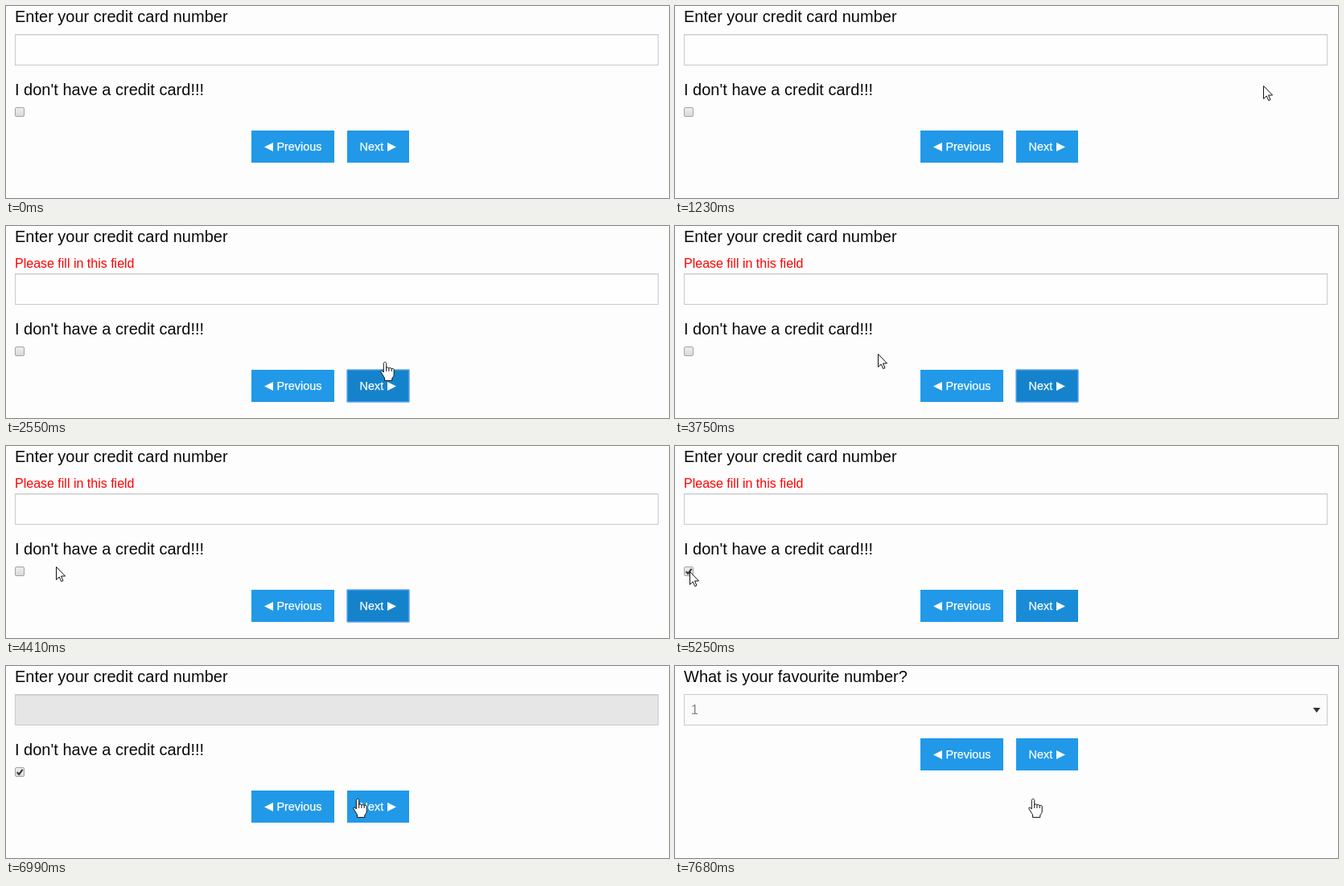
Animation of 824 by 239 pixels, one loop 8 s. Source, as an HTML page:

```html
<!DOCTYPE html>
<html lang="en">
<head>
<meta charset="utf-8">
<title>Credit card form</title>
<style>
  html, body { margin: 0; width: 100%; height: 100%; overflow: hidden; background: #fdfdfd; }
  svg { display: block; }
  text { font-family: "Liberation Sans", Arial, sans-serif; font-size: 20px; fill: #0a0a0a; }
  .button text { font-size: 14.4px; fill: #fefefe; stroke: #fefefe; stroke-width: .25; }
  .button path { fill: #fefefe; }
  #error { font-size: 16px; fill: #f00; }
  .field { stroke: #cacaca; }
</style>
</head>
<body>
<svg width="824" height="239" viewBox="0 0 824 239">
  <defs>
    <linearGradient id="boxFill" x2="0" y2="1">
      <stop offset="0" stop-color="#eee"/>
      <stop offset="1" stop-color="#d9d9d9"/>
    </linearGradient>
  </defs>

  <text id="title" x="11" y="20"></text>
  <text id="error" x="11" y="52">Please fill in this field</text>

  <g id="card">
    <rect id="input" class="field" x="11.5" y="35.5" width="799" height="38"/>
    <path d="M12 36.5H810" stroke="#0a0a0a" stroke-opacity=".08"/>
    <text x="11" y="111">I don't have a credit card!!!</text>
    <rect x="11.5" y="126.5" width="11" height="11" rx="1.5" fill="url(#boxFill)" stroke="#a3a3a3"/>
    <path id="check" d="M13.7 132.2L16.2 134.8L20.6 128.8" fill="none" stroke="#3c3c3c" stroke-width="2.2"/>
  </g>

  <g id="select">
    <rect class="field" x="11.5" y="35.5" width="799" height="38" fill="#fbfbfb"/>
    <text x="20" y="60" style="font-size:16px;fill:#85857a">1</text>
    <path d="M793 52H802L797.5 58Z" fill="#333"/>
  </g>

  <g id="buttons" class="button">
    <rect x="305" y="155" width="103" height="40" fill="#2199e8"/>
    <path d="M321 175.5L332 170V181Z"/>
    <text x="336.4" y="180">Previous</text>
    <rect id="next" x="424" y="155" width="77" height="40"/>
    <rect id="ring" x="424" y="155" width="77" height="40" rx="1" fill="none"
      stroke="#5ba3f2" stroke-width="2" stroke-opacity=".7"/>
    <text x="439.6" y="180">Next</text>
    <path d="M474 170L485 175.5L474 181Z"/>
  </g>

  <g id="cursor" fill="#fff" stroke="#111" stroke-linejoin="round">
    <path id="arrow" d="M.5 .5V16.5L4.2 13L6.8 18.6L9 17.7L6.5 12H11.6Z"/>
    <path id="beam" d="M-3 -8.5H-1L.5 -7.5L2 -8.5H4M.5 -7.5V7.5M-3 8.5H-1L.5 7.5L2 8.5H4" fill="none"/>
    <g id="hand" transform="translate(-6)">
      <path d="M6 .5C4.9 .5 4.3 1.3 4.3 2.3V13L2.9 11.5C1.8 10.4 .3 11.3 .9 12.7L4.4 18.3C5.2 19.5 5.6 20 5.6 21V23.4H14.8V21C15.4 19.3 17.2 18.2 17.2 16V10C17.2 8.1 14.4 8 14.2 9.3C14.1 7.2 11 7 10.9 8.5C10.7 6.6 7.8 6.5 7.7 8V2.3C7.7 1.3 7.1 .5 6 .5Z"/>
      <path d="M7.7 8V12M10.9 8.5V12M14.2 9.3V12" fill="none"/>
    </g>
  </g>
</svg>
<script>
const LOOP = 8000, STEP = 30;
const $ = id => document.getElementById(id);
const set = (id, name, value) => $(id).setAttribute(name, value);
const show = (id, on) => set(id, "visibility", on ? "visible" : "hidden");
const ramp = (t, a, b) => Math.min(1, Math.max(0, (t - a) / (b - a)));

const easeIn = k => k * k;
const easeOut = power => k => 1 - (1 - k) ** power;
const smooth = k => k * k * (3 - 2 * k);

// Each move continues from where the last one ended; bend bows it vertically.
const origin = { x: 814, y: 46 };
const moves = [
  { from: 720, to: 900, x: 774, y: 88, bend: 0, ease: easeOut(1.5) },
  { from: 900, to: 1500, x: 632, y: 126, bend: 0, ease: easeIn },
  { from: 1500, to: 2100, x: 471, y: 169, bend: 4, ease: easeOut(1.2) },
  { from: 3270, to: 4080, x: 128, y: 150, bend: 2, ease: smooth },
  { from: 4080, to: 4860, x: 18, y: 156, bend: -4, ease: easeOut(1.67) },
  { from: 5910, to: 6720, x: 384, y: 168, bend: 1.5, ease: easeOut(1.37) },
  { from: 6750, to: 7110, x: 445, y: 165, bend: 0, ease: easeOut(1.85) }
];

function pointer(t) {
  let { x, y } = origin;
  for (const m of moves) {
    if (t < m.from) break;
    const e = m.ease(ramp(t, m.from, m.to));
    x += (m.x - x) * e;
    y += (m.y - y) * e + m.bend * 4 * e * (1 - e);
  }
  return [Math.round(x), Math.round(y)];
}

function cursorShape(t, x, y) {
  if (t < 3300) {
    if (x < 811 && y < 74) return "beam";
    return x <= 501 ? "hand" : "arrow";
  }
  const onButton = x >= 305 && x < 408 || x >= 424;
  return t > 5340 && onButton ? "hand" : "arrow";
}

function mix(k) {
  const from = [33, 153, 232], to = [21, 131, 204];
  return `rgb(${from.map((c, i) => Math.round(c + (to[i] - c) * k))})`;
}

function draw(t) {
  const failed = t >= 2460 && t < 5280;
  const second = t >= 7650;
  const shift = failed ? 24 : 0;

  $("title").textContent = second ? "What is your favourite number?" : "Enter your credit card number";
  show("error", failed);
  set("card", "display", second ? "none" : "inline");
  set("select", "display", second ? "inline" : "none");
  set("card", "transform", `translate(0 ${shift})`);
  set("input", "fill", t >= 5280 ? "#e6e6e6" : "#fefefe");
  show("check", t >= 5250);

  set("buttons", "transform", `translate(0 ${second ? -65 : shift})`);
  set("next", "fill", mix(ramp(t, 2340, 2550) - ramp(t, 5190, 5340)));
  show("ring", t >= 2370 && t < 5220);

  const [x, y] = pointer(t), shape = cursorShape(t, x, y);
  set("cursor", "display", t < 720 ? "none" : "inline");
  set("cursor", "transform", `translate(${x} ${y})`);
  for (const id of ["arrow", "beam", "hand"]) show(id, id === shape);
}

const start = performance.now();
function tick() {
  const t = (performance.now() - start) % LOOP;
  draw(Math.floor(t / STEP) * STEP);
  requestAnimationFrame(tick);
}
tick();
</script>
</body>
</html>
```
